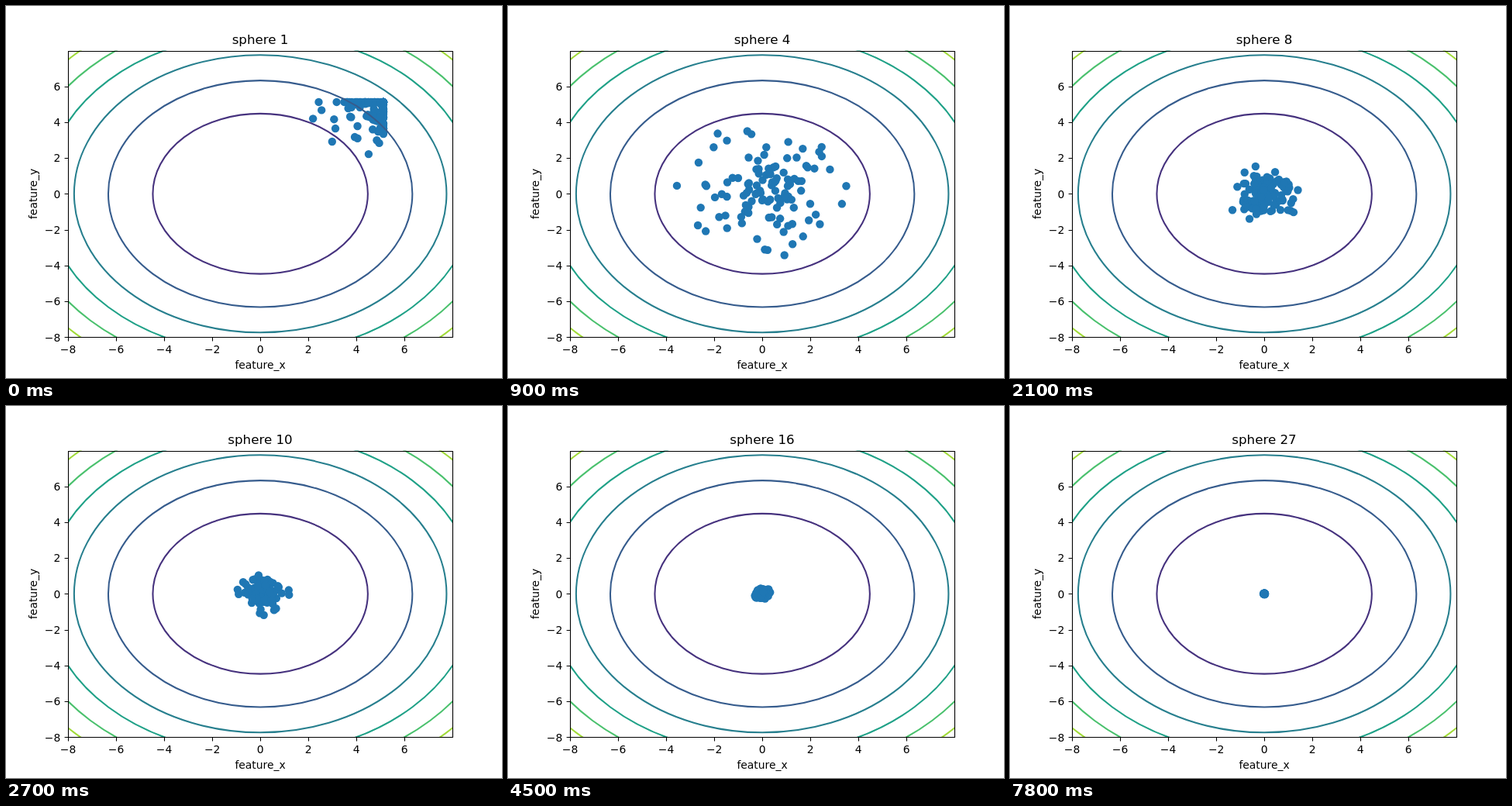
An HTML page for the animation above (8 s loop, 640 by 480 pixels).

```html
<!DOCTYPE html>
<html lang="en">
<head>
<meta charset="utf-8">
<title>Sphere optimisation</title>
<style>
html, body { margin: 0; width: 100%; height: 100%; overflow: hidden; background: #fff; }
svg { display: block; }
text { font: 13.89px "DejaVu Sans", sans-serif; text-anchor: middle; }
#title { font-size: 16.67px; }
.end { text-anchor: end; }
#rings { fill: none; stroke-width: 2.08; }
#dots { fill: #1f77b4; }
#axes { fill: none; stroke: #000; stroke-width: 1.1; }
</style>
</head>
<body>
<svg width="640" height="480" viewBox="0 0 640 480">
  <clipPath id="plot"><rect x="80" y="57.6" width="496" height="369.6"/></clipPath>
  <g clip-path="url(#plot)"><g id="dots"></g><g id="rings"></g></g>
  <path id="axes"/>
  <g id="labels"></g>
  <text id="title" x="328" y="49"></text>
  <text x="328" y="468">feature_x</text>
  <text transform="translate(40 242.4) rotate(-90)">feature_y</text>
</svg>
<script>
const $ = id => document.getElementById(id);
const STEP = 300, LOOP = 8000, COUNT = 110, BOUND = 5.12;

// Both axes run from -8 to 7.99
const SX = 496 / 15.99, SY = 369.6 / 15.99;
const X = v => 80 + (v + 8) * SX, Y = v => 427.2 - (v + 8) * SY;
const snap = v => Math.floor(v + 0.5) + 0.5;

// Contours of x² + y² at multiples of 20
$('rings').innerHTML = ['#46327e', '#365c8d', '#277f8e', '#1fa187', '#4ac16d', '#a0da39']
  .map((color, i) => {
    const r = Math.sqrt(20 * (i + 1));
    return `<ellipse cx="${X(0)}" cy="${Y(0)}" rx="${r * SX}" ry="${r * SY}" stroke="${color}"/>`;
  }).join('');

let axes = 'M80.5 58.5H576.5V427.5H80.5Z', labels = '';
for (let v = -8; v <= 6; v += 2) {
  const name = String(v).replace('-', '\u2212');
  axes += `M${snap(X(v))} 427.5V432.4M80.5 ${snap(Y(v))}H75.6`;
  labels += `<text x="${X(v)}" y="448">${name}</text>` +
    `<text class="end" x="70.3" y="${Math.round(Y(v) + 5.3)}">${name}</text>`;
}
$('axes').setAttribute('d', axes);
$('labels').innerHTML = labels;

function randomFrom(seed) {
  return () => (seed = (seed * 16807 + 11) % 2147483647) / 2147483647;
}

// Each generation is a normal cloud that drifts to the origin and shrinks,
// kept inside the search bounds
function cloud(gen) {
  const rand = randomFrom(gen * 7919 + 123457);
  const mean = 4.9 * 0.35 ** (gen - 1);
  const spread = gen === 1 ? 1 : 1.3 * 0.826 ** (gen - 4);
  const place = offset => Math.min(BOUND, mean + spread * offset);
  return Array.from({ length: COUNT }, () => {
    const r = Math.min(2.9, Math.sqrt(-2 * Math.log(1 - rand())));
    const a = rand() * 2 * Math.PI;
    return [place(r * Math.cos(a)), place(r * Math.sin(a))];
  });
}

let shown = 0;
const start = performance.now();
function draw() {
  const gen = Math.floor((performance.now() - start) % LOOP / STEP) + 1;
  if (gen !== shown) {
    shown = gen;
    $('title').textContent = 'sphere ' + gen;
    $('dots').innerHTML = cloud(gen)
      .map(([x, y]) => `<circle cx="${X(x)}" cy="${Y(y)}" r="5.2"/>`).join('');
  }
  requestAnimationFrame(draw);
}
draw();
</script>
</body>
</html>
```
